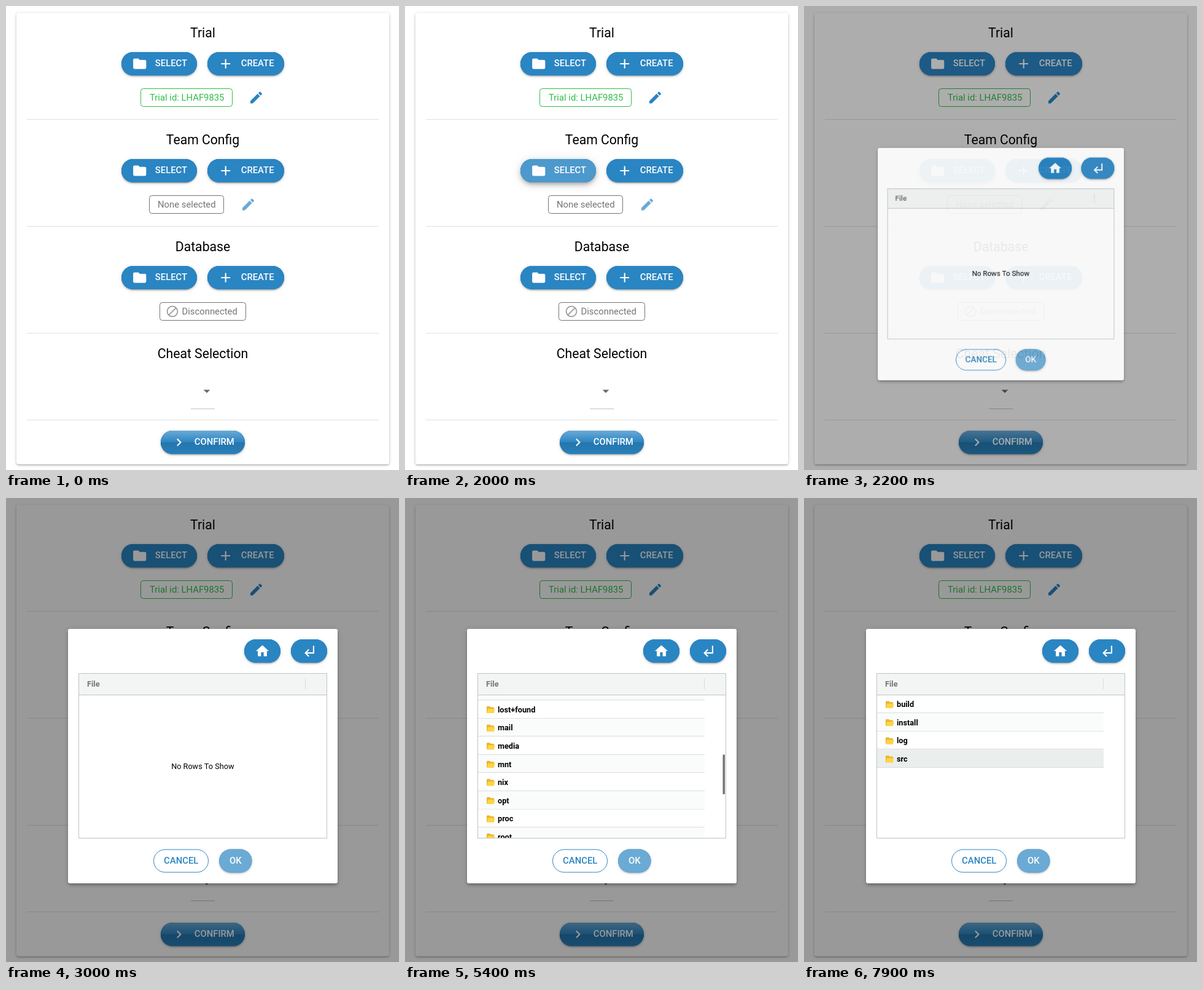
Write an HTML page with a canvas that moves like this. It is 640 by 755 pixels and loops after 8000 ms.

```html
<!DOCTYPE html>
<html lang="en">
<head>
<meta charset="utf-8">
<title>Trial setup</title>
<style>
html, body { margin: 0; width: 100%; height: 100%; overflow: hidden; background: #fff; }
canvas { display: block; }
</style>
</head>
<body>
<canvas id="stage" width="640" height="755"></canvas>
<script>
const W = 640, H = 755, LOOP = 8000, STEP = 100;
const BLUE = '#2a85c3', GREEN = '#30bd49', GREY = '#757575';
const ICON = 25.4;

const stage = document.getElementById('stage').getContext('2d');
const layer = document.createElement('canvas');
layer.width = W;
layer.height = H;
const sheet = layer.getContext('2d');
let c = stage;

const ICONS = {
  folder: 'M10 4H4c-1.1 0-2 .9-2 2v12c0 1.1.9 2 2 2h16c1.1 0 2-.9 2-2V8c0-1.1-.9-2-2-2h-8z',
  add: 'M19 13h-6v6h-2v-6H5v-2h6V5h2v6h6z',
  edit: 'M3 17.25V21h3.75L17.81 9.94l-3.75-3.75zM20.71 7.04c.39-.39.39-1.02 0-1.41l-2.34-2.34c-.39-.39-1.02-.39-1.41 0l-1.83 1.83 3.75 3.75z',
  block: 'M12 2C6.48 2 2 6.48 2 12s4.48 10 10 10 10-4.48 10-10S17.52 2 12 2zM4 12c0-4.42 3.58-8 8-8 1.85 0 3.55.63 4.9 1.69L5.69 16.9C4.63 15.55 4 13.85 4 12zm8 8c-1.85 0-3.55-.63-4.9-1.69L18.31 7.1C19.37 8.45 20 10.15 20 12c0 4.42-3.58 8-8 8z',
  chevron: 'M10 6L8.59 7.41 13.17 12l-4.58 4.59L10 18l6-6z',
  drop: 'M7 10l5 5 5-5z',
  home: 'M10 20v-6h4v6h5v-8h3L12 3 2 12h3v8z',
  back: 'M11 9l1.42 1.42L8.83 14H18V4h2v12H8.83l3.59 3.58L11 21l-6-6z'
};
for (const k in ICONS) ICONS[k] = new Path2D(ICONS[k]);

// Each shadow: dy, blur, spread, alpha
const LOW = [[3, 1, -2, .12], [2, 2, 0, .14], [1, 5, 0, .2]];
const RAISED = [[1, 14, 0, .12], [5, 8, 0, .14], [3, 5, -1, .2]];
const MODAL = [[1, 10, 0, .12], [4, 5, 0, .14], [2, 4, -1, .2]];

const ROOT = ('ariac_ws bin boot dev etc home lib lib.usr-is-merged lib32 lib64 libexec libx32 ' +
  'lost+found mail media mnt nix opt proc root run sbin srv sys team_ws tmp usr var').split(' ');
const TEAM = ['build', 'install', 'log', 'src'];
const ROW = 29.55, LIST_TOP = 320.7, LIST_END = 553, MAX_SCROLL = 593.5;

const ramp = (t, from, to) => Math.min(1, Math.max(0, (t - from) / (to - from)));
const easeOut = (p, n = 3) => 1 - (1 - p) ** n;
const easeInOut = p => p * p * (3 - 2 * p);

function rounded(x, y, w, h, r) {
  c.beginPath();
  c.roundRect(x, y, w, h, r);
}

function panel(x, y, w, h, r, fill, shadows, strength = 1) {
  c.save();
  c.fillStyle = fill;
  for (const [dy, blur, spread, alpha] of shadows) {
    c.shadowOffsetY = dy;
    c.shadowBlur = blur;
    c.shadowColor = `rgba(0,0,0,${alpha * strength})`;
    rounded(x - spread, y - spread, w + 2 * spread, h + 2 * spread, Math.max(0, r + spread));
    c.fill();
  }
  c.shadowColor = 'transparent';
  rounded(x, y, w, h, r);
  c.fill();
  c.restore();
}

function outline(x, y, w, h, r, color) {
  c.strokeStyle = color;
  c.lineWidth = 1;
  rounded(x + .5, y + .5, w - 1, h - 1, r);
  c.stroke();
}

function text(str, x, y, size, color, weight = 400, align = 'left') {
  c.font = `${weight} ${size}px Roboto, sans-serif`;
  c.textAlign = align;
  c.fillStyle = color;
  c.fillText(str, x, y);
}

function icon(name, cx, cy, color, size = ICON) {
  c.save();
  c.translate(cx - size / 2, cy - size / 2);
  c.scale(size / 24, size / 24);
  c.fillStyle = color;
  c.fill(ICONS[name]);
  c.restore();
}

function hline(x1, x2, y, color) {
  c.fillStyle = color;
  c.fillRect(x1, y, x2 - x1, 1);
}

function button(x, y, w, { glyph, label, hover = 0, pressed = false, glossy = false, ripple }) {
  panel(x, y, w, 38, 19, BLUE, pressed ? RAISED : LOW);
  rounded(x, y, w, 38, 19);
  if (glossy) {
    const g = c.createLinearGradient(0, y, 0, y + 38);
    g.addColorStop(0, 'rgba(255,255,255,.3)');
    g.addColorStop(.5, 'rgba(255,255,255,0)');
    g.addColorStop(.51, 'rgba(0,0,0,.12)');
    g.addColorStop(1, 'rgba(0,0,0,.04)');
    c.fillStyle = g;
    c.fill();
  }
  if (hover) {
    c.fillStyle = `rgba(255,255,255,${.16 * hover})`;
    c.fill();
  }
  if (ripple) {
    c.save();
    c.clip();
    c.beginPath();
    c.arc(x + w / 2, y + 18.5, ripple.radius, 0, 7);
    c.fillStyle = `rgba(255,255,255,${ripple.alpha})`;
    c.fill();
    c.restore();
  }
  icon(glyph, label ? x + 29.7 : x + w / 2, y + 19, '#fff');
  if (label) text(label, x + 54.8, y + 23.3, 14.84, '#fff', 500);
}

function chip(label, x, y, w, color, textX) {
  outline(x, y, w, 30, 4, color);
  text(label, textX, y + 20, 14.84, color);
}

function drawPage(t) {
  c.fillStyle = '#fff';
  c.fillRect(0, 0, W, H);
  panel(17, 11.5, 607, 734, 4, '#fff', LOW);

  const hover = easeOut(ramp(t, 1200, 1600));
  ['Trial', 'Team Config', 'Database', 'Cheat Selection'].forEach((title, i) => {
    const y = 174 * i;
    text(title, 320.5, y + 50.6, 21.2, '#000', 400, 'center');
    if (i === 3) return;
    const active = i === 1;
    button(188, y + 75, 123, {
      glyph: 'folder', label: 'SELECT',
      hover: active ? hover : 0, pressed: active && t >= 1900
    });
    button(328, y + 75, 125, { glyph: 'add', label: 'CREATE' });
    hline(34, 607, y + 184, '#e0e0e0');
  });
  hline(34, 607, 673, '#e0e0e0');

  chip('Trial id: LHAF9835', 219, 134, 150, GREEN, 234);
  icon('edit', 407.5, 149, BLUE);
  chip('None selected', 233, 308, 122, GREY, 247);
  icon('edit', 394.5, 323, '#6aaad5');
  chip('Disconnected', 250, 482, 141, GREY, 286.5);
  icon('block', 271, 497, '#9e9e9e', 22.3);

  icon('drop', 327, 626.5, '#666872');
  hline(301, 340, 655, '#c2c2c2');
  button(252, 691, 137, { glyph: 'chevron', label: 'CONFIRM', glossy: true });
}

function folderGlyph(x, y) {
  c.fillStyle = '#e9b62f';
  rounded(x, y, 6, 4, 1);
  c.fill();
  rounded(x, y + 1.5, 12, 9.5, 1);
  c.fill();
  c.fillStyle = '#fdd545';
  c.beginPath();
  c.moveTo(x + 2, y + 4);
  c.lineTo(x + 13.5, y + 4);
  c.lineTo(x + 12, y + 11);
  c.lineTo(x + .3, y + 11);
  c.fill();
}

function drawRows(names, scroll, hovered) {
  names.forEach((name, i) => {
    const y = LIST_TOP + i * ROW - scroll;
    if (y > LIST_END || y + ROW < LIST_TOP) return;
    c.fillStyle = i === hovered ? '#eaeeed' : i % 2 ? '#fafcfb' : '#fff';
    c.fillRect(119, y, 369, ROW);
    hline(119, 488, Math.round(y + ROW - 1), '#d9dcde');
    folderGlyph(133, y + 9.8);
    text(name, 151, y + 19.6, 12.7, '#000', 700);
  });
}

function drawList(t) {
  if (t < 4200) {
    text('No Rows To Show', 320.3, 440.6, 12.7, '#000', 400, 'center');
    return;
  }
  c.save();
  c.beginPath();
  c.rect(119, 320.5, 403, LIST_END - 320.5);
  c.clip();
  if (t < 6900) {
    const p = easeInOut(ramp(t, 4900, 5800));
    drawRows(ROOT, p * MAX_SCROLL, t >= 6200 ? 24 : t >= 4700 ? 4 : -1);
    c.fillStyle = t < 4300 ? '#c6c6c6' : '#757575';
    rounded(517.5, 321 + p * 165, 3.5, 65, 1.5);
    c.fill();
  } else {
    drawRows(TEAM, 0, t >= 7900 ? 3 : -1);
  }
  c.restore();
}

function drawDialog(t) {
  c.clearRect(0, 0, W, H);
  panel(101, 213, 439, 414, 4, '#fff', MODAL);

  const hover = easeOut(ramp(t, 3900, 4200)) * (1 - ramp(t, 4400, 4700));
  const grow = ramp(t, 4150, 4375);
  const ripple = grow && { radius: 4 + 31 * grow, alpha: .17 * (1 - ramp(t, 4375, 4625)) };
  button(388, 230, 59, { glyph: 'home' });
  button(464, 230, 59, { glyph: 'back', hover, ripple, pressed: t >= 4100 && t < 4400 });

  c.fillStyle = '#f3f5f4';
  c.fillRect(119, 285, 403, 35);
  text('File', 132, 306.7, 12.7, '#747676', 700);
  c.fillStyle = '#d8dcdd';
  c.fillRect(487, 294, 1, 17);
  drawList(t);
  hline(119, 522, 320, '#bdc3c7');
  outline(118, 285, 405, 269, 0, '#bdc3c7');

  outline(240, 571.5, 90, 38, 19, BLUE);
  text('CANCEL', 285.2, 594.8, 14.84, BLUE, 500, 'center');
  panel(347, 571.5, 53.5, 38, 19, '#6aaad5', LOW, .7);
  text('OK', 373.7, 594.8, 14.84, '#fff', 500, 'center');
}

function draw(t) {
  c = stage;
  drawPage(t);
  const open = ramp(t, 2033, 2333);
  if (!open) return;

  stage.fillStyle = `rgba(0,0,0,${.4 * easeOut(open, 2)})`;
  stage.fillRect(0, 0, W, H);
  c = sheet;
  drawDialog(t);
  const p = easeOut(open);
  stage.save();
  stage.globalAlpha = p;
  stage.translate(320.5, 420);
  stage.scale(p, p);
  stage.drawImage(layer, -320.5, -420);
  stage.restore();
}

const start = performance.now();
function tick() {
  const t = (performance.now() - start) % LOOP;
  draw(Math.floor(t / STEP) * STEP);
  requestAnimationFrame(tick);
}
tick();
</script>
</body>
</html>
```
